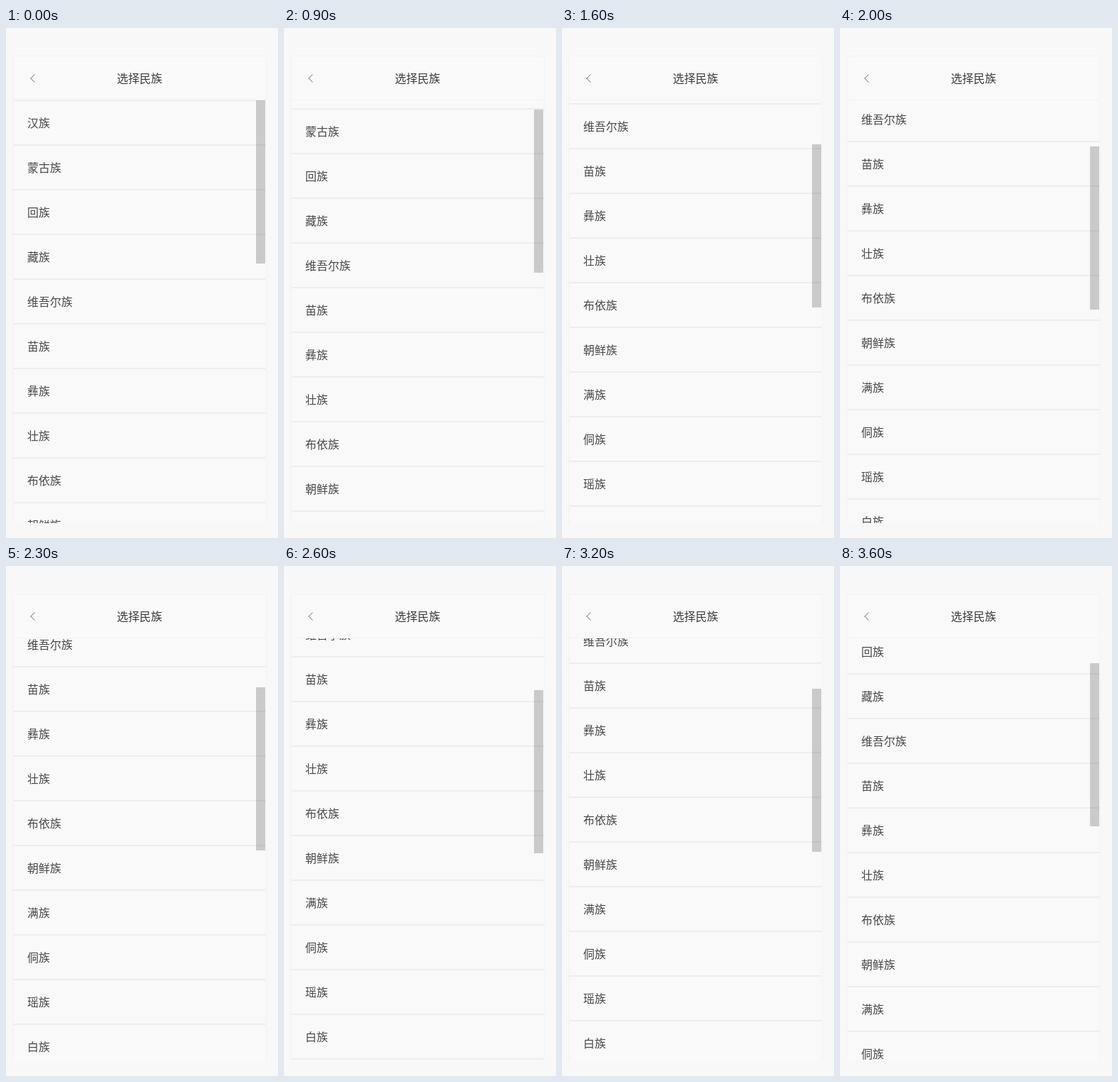
An HTML page that plays this animation: 384x719 px, repeating every 4.3 s.

```html
<!DOCTYPE html>
<html lang="zh-CN">
<head>
<meta charset="utf-8">
<title>选择民族</title>
<style>
  html, body {
    margin: 0;
    width: 100%;
    height: 100%;
    overflow: hidden;
    background: #f8f8f8;
  }
  body {
    position: relative;
    font: 300 16px/61px "Noto Sans CJK SC", "Noto Sans CJK", "Noto Sans", sans-serif;
    color: #484848;
  }
  header, .view, .thumb { position: absolute; }
  header {
    left: 9px;
    top: 39px;
    width: 357px;
    height: 61px;
    border: 1px solid #f2f2f3;
    border-radius: 3px;
    background: #f9f9f9;
    text-align: center;
    color: #3a3a3a;
  }
  header svg { position: absolute; left: 20px; top: 22px; }
  .view {
    left: 9px;
    top: 102px;
    width: 359px;
    height: 596px;
    overflow: hidden;
  }
  .row {
    box-sizing: border-box;
    height: 63px;
    padding-left: 20px;
    border: 1px solid #ededf1;
    border-left-color: #f2f2f3;
    border-right-color: #f2f2f3;
    border-radius: 3px;
    background: #f9f9f9;
  }
  .thumb {
    left: 344px;
    top: 0;
    width: 13px;
    height: 230px;
    background: rgba(0, 0, 0, .19);
  }
</style>
</head>
<body>
<header>
  <svg width="16" height="18" fill="none">
    <path d="M10.5 3.5 L4.7 9.2" stroke="#8a6a52"/>
    <path d="M4.7 8.8 L10.5 14.5" stroke="#5a6f86"/>
  </svg>
  选择民族
</header>
<div class="view">
  <div class="list"></div>
  <div class="thumb"></div>
</div>
<script>
  const LOOP = 4300;
  const TICK = 100;
  const THUMB_RATIO = 0.2525;
  const names = '汉 蒙古 回 藏 维吾尔 苗 彝 壮 布依 朝鲜 满 侗 瑶 白 土家 哈尼 哈萨克'.split(' ');

  // Each drag starts at a time, lasts some ticks and ends at a scroll offset;
  // a higher snap makes it start faster.
  const drags = [
    { start: 900, ticks: 5, to: 239, snap: 1.58 },
    { start: 1500, ticks: 2, to: 247, snap: 1 },
    { start: 1900, ticks: 5, to: 275, snap: 1 },
    { start: 2500, ticks: 6, to: 329, snap: 1 },
    { start: 3100, ticks: 6, to: 139, snap: 1 }
  ];

  const list = document.querySelector('.list');
  const thumb = document.querySelector('.thumb');

  for (const name of names) {
    const row = document.createElement('div');
    row.className = 'row';
    row.textContent = name + '族';
    list.append(row);
  }

  function ease(x, snap) {
    const u = 1 - (1 - x) ** snap;
    return u * u * (3 - 2 * u);
  }

  function scrollAt(time) {
    return drags.reduce((from, { start, ticks, to, snap }) => {
      const tick = Math.floor((time - start) / TICK) + 1;
      const x = Math.min(Math.max(tick / ticks, 0), 1);
      return from + (to - from) * ease(x, snap);
    }, 0);
  }

  function moveY(el, y) {
    el.style.transform = `translateY(${Math.round(y)}px)`;
  }

  const begin = performance.now();

  function draw() {
    const scroll = scrollAt((performance.now() - begin) % LOOP);
    moveY(list, -scroll);
    moveY(thumb, scroll * THUMB_RATIO);
    requestAnimationFrame(draw);
  }
  draw();
</script>
</body>
</html>
```
